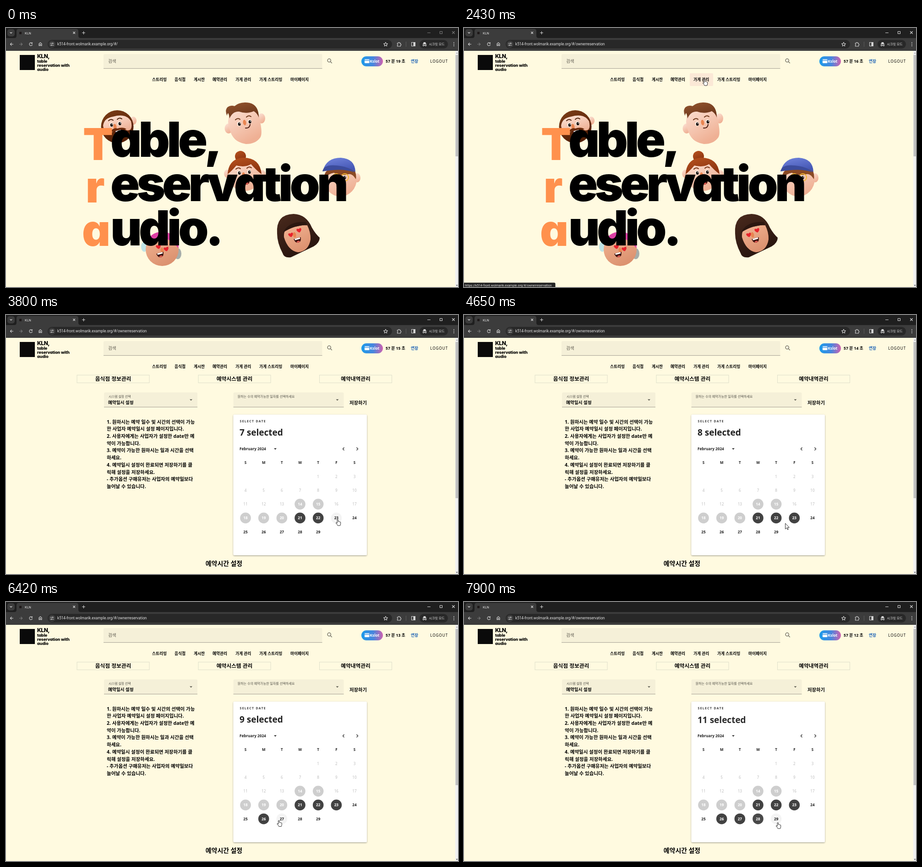
Write an HTML page that moves like this. It is 987 px wide and 567 px high and loops after 8000 ms.

```html
<!DOCTYPE html>
<html lang="ko">
<head>
<meta charset="utf-8">
<title>KLN</title>
<style>
html, body { margin: 0; width: 100%; height: 100%; overflow: hidden; background: #fffae0; }
svg { display: block; width: 987px; height: 567px; font-family: "Noto Sans", "Noto Sans CJK KR", "Noto Sans CJK", sans-serif; font-weight: 600; }
.ui { font-family: Roboto, "Noto Sans CJK KR", "Noto Sans CJK", sans-serif; font-weight: 400; fill: #e3e3e3; }
.big { font-family: Inter, sans-serif; font-weight: 800; font-feature-settings: "cv11"; }
.hero { font-weight: 900; letter-spacing: -6.8px; }
.line { fill: none; stroke: #d5d5d5; stroke-width: 1.1; stroke-linecap: round; stroke-linejoin: round; }
.mid { text-anchor: middle; }
</style>
</head>
<body>
<svg id="stage" viewBox="0 0 987 567"></svg>
<script>
const LOOP = 8000;
const HOST = 'k514-front.wolmarik.example.org/#/';
const ORANGE = '#ff914d';
const PAGE_AT = 2516, ACTIVE_AT = 2340, STATUS_AT = 1400;

const text = (x, y, size, str, attrs = '') => `<text x="${x}" y="${y}" font-size="${size}" ${attrs}>${str}</text>`;
const rect = (x, y, w, h, fill, attrs = '') => `<rect x="${x}" y="${y}" width="${w}" height="${h}" fill="${fill}" ${attrs}/>`;
const path = (d, attrs = 'class="line"') => `<path d="${d}" ${attrs}/>`;
const oval = (x, y, rx, ry, fill, attrs = '') => `<ellipse cx="${x}" cy="${y}" rx="${rx}" ry="${ry}" fill="${fill}" ${attrs}/>`;
const shape = (d, fill) => path(d, `fill="${fill}"`);
const stroke = (d, color, width) => path(d, `fill="none" stroke="${color}" stroke-width="${width}" stroke-linecap="round"`);

// ---------- browser window ----------
const browser = () => [
  rect(0, 0, 987, 50, '#1f1f1f'),
  rect(0, 22, 987, 28, '#3c3c3c'),
  shape('M18 22Q23 22 23 17V7Q23 2 28 2H153Q158 2 158 7V17Q158 22 163 22Z', '#3c3c3c'),
  rect(3, 2.5, 16, 16, '#3c3c3c', 'rx="5"'),
  path('M9 9.5l2 2l2-2'),
  rect(29, 8.5, 5, 5, '#1c1717'),
  text(41, 14, 7.4, 'KLN', 'class="ui"'),
  path('M146.7 8.5l4 4m0-4l-4 4'),
  path('M166.5 10.5h6m-3-3v6'),
  `<g id="controls">${path('M920.5 10.5h6M947.5 7.5h5v5h-5zM974.5 7.5l5 5m0-5l-5 5')}</g>`,
  path('M15.5 35.5h-6m2.7-2.8l-2.8 2.8l2.8 2.8'),
  path('M29.5 35.5h6m-2.7-2.8l2.8 2.8l-2.8 2.8', 'class="line" opacity=".4"'),
  path('M57 33.5a3.3 3.3 0 1 0 .4 3M57.3 31.8v2.2h-2.2'),
  path('M72 34.5l3-2.6l3 2.6v4.2h-2v-2.6h-2v2.6h-2z'),
  rect(91, 26, 752, 19, '#282828', 'rx="9.5"'),
  oval(100.5, 35.5, 7.5, 7.5, '#3c3c3c'),
  path('M97 33.5h3m3 0h1M97 37.5h1m3 0h3'),
  oval(101.7, 33.5, 1.2, 1.2, '#d5d5d5'), oval(99.3, 37.5, 1.2, 1.2, '#d5d5d5'),
  text(112, 38.4, 8.2, '', 'class="ui" id="url"'),
  path('M829 31.2l1.3 2.9l3.1.3l-2.3 2.1l.6 3.1l-2.7-1.6l-2.7 1.6l.6-3.1l-2.3-2.1l3.1-.3z'),
  path('M854.5 33h2.2a1.4 1.4 0 0 1 2.8 0h2v2.2a1.4 1.4 0 0 1 0 2.8v2h-7v-2.3a1.3 1.3 0 0 0 0-2.5z'),
  rect(873, 30, 1, 11, '#5c5c5c'),
  rect(885.5, 31.5, 8, 8, 'none', 'stroke="#d5d5d5"'), rect(889.5, 31.5, 4, 8, '#d5d5d5'),
  rect(903, 26, 62, 19, '#282828', 'rx="9.5"'),
  shape('M909.5 35.3h9v-.9h-1.4l-1-3.2h-4.2l-1 3.2h-1.4z', '#e3e3e3'),
  path('M913 38a1.4 1.4 0 1 0-.01.1M917.8 38a1.4 1.4 0 1 0-.01.1M913 37.6h2'),
  text(923.5, 38, 7.1, '시크릿 모드', 'class="ui"'),
  ...[32, 35.5, 39].map(y => oval(978, y, .9, .9, '#d5d5d5')),
].join('');

// ---------- page header ----------
const NAV = [['스트리밍', 319, 351], ['음식점', 368, 392], ['게시판', 410, 434], ['예약관리', 451, 484],
  ['가게 관리', 501, 536, 'ownerreservation'], ['가게 스트리밍', 553, 603, 'ownerstreaming'], ['마이페이지', 621, 661]];

const field = (x, y, w, h) => shape(`M${x} ${y + h}v${3 - h}q0-3 3-3h${w - 6}q3 0 3 3v${h - 3}z`, '#f5f0d8')
  + rect(x, y + h - .8, w, .9, '#98958a');

const header = () => [
  rect(30, 59, 33, 33, '#0a0a0a'),
  `<g class="big">${text(68, 66, 12, 'KLN,', 'letter-spacing="-.5"')}${['table', 'reservation with', 'audio']
    .map((s, i) => text(68, 76 + 9 * i, 9, s, 'letter-spacing="-.15"')).join('')}</g>`,
  field(213, 57, 477.5, 32),
  text(223, 76, 9.5, '검색', 'fill="#5c594e" font-weight="400"'),
  path('M709.3 71a3.6 3.6 0 1 0-7.2 0a3.6 3.6 0 0 0 7.2 0M708.4 73.6l3.4 3.4', 'fill="none" stroke="#66645a" stroke-width="1.3"'),
  rect(776, 62, 47, 22, 'url(#pill)', 'rx="11"'),
  rect(783, 68.5, 10.5, 8.5, '#fff', 'rx="1.2"'), rect(783, 70.3, 10.5, 1.4, '#3a8fe0'),
  text(794.5, 76, 8.3, 'Kslot', 'fill="#fff" font-weight="700"'),
  text(829, 76, 8.7, '', 'id="timer"'),
  text(884, 76, 8.8, '연장', 'fill="#1c62b5"'),
  text(926.5, 75.7, 8, 'LOGOUT', 'letter-spacing="1" font-weight="500"'),
  rect(0, 99, 0, 28, '#fbe8d6', 'id="navHover" rx="2"'),
  ...NAV.map(([s, x]) => text(x, 116, 8.7, s)),
].join('');

// ---------- home page ----------
const eye = (x, y) => oval(x, y, 4.2, 4.8, '#fff8ee') + oval(x + .6, y + .4, 3, 3.6, '#1c1210') + oval(x + 1.6, y - 1, .9, .9, '#fff');
const heart = (x, y) => path('M0 5C-9-1-5-7 0-3C5-7 9-1 0 5Z', `fill="#e8222c" transform="translate(${x} ${y}) rotate(-14)"`);
const brow = (x, y, color) => stroke(`M${x - 5} ${y + 2}q5-5 10-1`, color, 2);
const nose = (x, y, color = '#e98550') => oval(x, y, 3.5, 6, color, `transform="rotate(-10 ${x} ${y})"`);
const grin = (x, y) => `<g transform="translate(${x} ${y}) rotate(-16)">${shape('M-8-4H8Q7 6 0 6T-8-4Z', '#3a0f0c')}${rect(-6, -4, 12, 3, '#fff')}${oval(0, 4, 3.5, 1.8, '#d9584f')}</g>`;
const SKIN = 'url(#skin)', TAN = 'url(#tan)';

const bearded = () => oval(278, 203, 7, 9, SKIN)
  + oval(243, 216, 35.5, 36, 'url(#brown)')
  + shape('M212 214Q214 197 234 194Q262 186 273 204Q278 226 264 224Q244 214 232 228Q216 238 212 214Z', SKIN)
  + brow(229, 201, '#4b1f09') + brow(248, 198, '#4b1f09') + eye(230, 212) + eye(248, 209) + nose(238, 216)
  + shape('M228 226Q236 217 243 220Q254 216 263 221Q250 226 245 223Q236 230 228 226Z', '#6b2b0c') + grin(246, 228);

const youth = () => oval(486, 220, 8.5, 11, SKIN) + oval(558, 198, 8, 11, SKIN)
  + path('M485 205Q487 170 520 169Q551 168 554 200Q561 232 555 240Q545 254 524 254Q502 251 493 234Q486 220 485 205Z', `fill="${SKIN}"`)
  + shape('M483 193Q477 180 484 173Q491 168 499 171Q512 160 532 164Q552 169 552 196Q549 187 541 182Q526 189 509 183Q495 182 488 198Q487 189 485 186Q482 190 483 193Z', 'url(#brown2)')
  + brow(506, 199, '#6a3417') + brow(530, 193, '#6a3417') + eye(509, 210) + eye(532, 205) + nose(521, 207)
  + stroke('M523 219Q532 220 533 211', '#4a1c10', 2);

const bun = () => oval(512, 281, 12, 12, 'url(#red)') + oval(483, 319, 7, 9, SKIN) + oval(560, 320, 7, 9, SKIN)
  + oval(521, 321, 36.5, 36, SKIN)
  + shape('M484 320Q486 286 518 284Q555 284 558 320Q545 310 535 298Q522 306 503 301Q492 314 484 320Z', 'url(#red)')
  + brow(507, 307, '#6d2b0d') + brow(531, 305, '#6d2b0d') + eye(509, 317) + eye(531, 315) + nose(519, 322) + grin(525, 337);

const capped = () => oval(691, 330, 7, 10, SKIN) + oval(767, 328, 7, 10, SKIN) + oval(730, 330, 36, 39, SKIN)
  + shape('M695 329Q694 312 712 306H758Q766 318 764 331Q756 318 748 320Q730 325 716 317Q704 319 695 329Z', '#8a4a24')
  + shape('M692 312Q700 284 731 284Q762 286 763 315Q745 303 722 303Q701 306 692 312Z', 'url(#blue)')
  + shape('M691 314Q694 298 722 301Q748 303 762 316Q735 306 691 314Z', '#3c4c9c')
  + eye(722, 327) + eye(739, 327)
  + [721, 740].map(x => oval(x, 327, 8, 8, 'none', 'stroke="#f1b532" stroke-width="2"')).join('') + nose(730, 334) + grin(730, 347);

const bob = () => shape('M592 450Q589 408 628 407Q656 408 668 437Q676 451 685 459Q685 470 672 478L622 502Q607 504 604 493Q592 470 592 450Z', 'url(#dark)')
  + shape('M607 458Q606 442 616 438L657 430Q666 448 665 463Q661 488 638 491Q616 488 607 458Z', TAN)
  + shape('M606 445Q620 422 655 425L658 432Q634 430 606 447Z', '#2c1710')
  + heart(622, 453) + heart(640, 443) + nose(630, 453) + grin(637, 464);

const pink = () => oval(302, 479, 7, 11, '#bfe4e6') + oval(375, 494, 8, 12, '#a6adaa')
  + oval(341, 485, 36, 36, TAN)
  + shape('M306 474Q314 444 346 446Q376 452 377 482Q362 466 348 460Q328 462 306 474Z', '#dd3fa4')
  + heart(333, 479) + heart(350, 484) + nose(341, 487) + grin(337, 496);

const home = () => [
  bearded(), youth(), bun(), capped(), bob(), pink(),
  '<g class="big hero">',
  ...[['T', 168, 289, 'able,', 282], ['r', 174, 382, 'eservation', 379], ['a', 166, 477, 'udio.', 476]]
    .map(([cap, x, y, rest, y2]) => text(x, y, 96, cap, `fill="${ORANGE}"`) + text(228, y2, 106, rest)),
  '</g>',
].join('');

// ---------- reservation page ----------
const NOTES = ['1. 원하시는 예약 일수 및 시간의 선택이 가능', '한 사업자 예약일시 설정 페이지입니다.', '2. 사용자에게는 사업자가 설정한 date만 예',
  '약이 가능합니다.', '3. 예약이 가능한 원하시는 일과 시간을 선택', '하세요.', '4. 예약일시 설정이 완료되면 저장하기를 클',
  '릭해 설정을 저장하세요.', '- 추가옵션 구매유저는 사업자의 예약일보다', '늘어날 수 있습니다.'];
const PAST = [14, 15, 18, 19, 20];
const PICKS = { 21: 2400, 22: 2400, 23: 4330, 26: 5960, 27: 6875, 28: 7722 };
const HEADS = [[PAGE_AT, '7 selected'], [4330, '8 selected'], [5960, '9 selected'], [6875, '10 selected'], [7722, '11 selected']];
const colX = c => 523 + 39.67 * c;
const DAYS = Array.from({ length: 29 }, (_, i) => {
  const n = i + 1, cell = n + 3;
  return { n, x: colX(cell % 7), y: 353.5 + 30.3 * Math.floor(cell / 7) };
});

const dayCell = ({ n, x, y }) => {
  const past = PAST.includes(n);
  const color = past ? '#fff' : n < 21 ? '#bdbdbd' : '#212121';
  const disc = (id, fill, opacity) => oval(x, y, 11.8, 11.8, fill, `id="${id}${n}" opacity="${opacity}"`);
  return (past ? disc('past', '#cecece', 1) : n > 20 ? disc('hover', '#f4f4f4', 0) + disc('pick', '#424242', 0) : '')
    + text(x, y + 3, 8.2, n, `class="mid" id="day${n}" fill="${color}" font-weight="${n < 21 && !past ? 400 : 600}"`);
};

const owner = () => [
  ...[[234, '음식점 정보관리'], [499, '예약시스템 관리'], [763.5, '예약내역관리']].map(([x, s]) =>
    rect(x - 79, 131.5, 158, 17, 'none', 'stroke="#dedfca"') + text(x, 143.5, 11.7, s, 'class="mid" font-weight="700"')),
  field(214, 169.5, 204, 32.5), field(496.5, 169.5, 241, 32.5),
  text(224, 181, 7, '시스템 설정 선택', 'fill="#55534a" font-weight="400"'),
  text(223, 195, 9.6, '예약일시 설정'),
  text(505.5, 181, 7.1, '원하는 수의 예약가능한 일자를 선택하세요', 'fill="#55534a" font-weight="400"'),
  ...[404, 723.5].map(x => shape(`M${x - 3} 184.5h6l-3 3z`, '#5a584e')),
  text(750, 195.5, 10.3, '저장하기', 'font-weight="700"'),
  ...NOTES.map((s, i) => text(220, 237.6 + 15.72 * i, 10.5, s)),
  rect(496.5, 218, 291.5, 308, '#fff', 'rx="2.5" filter="url(#shadow)"'),
  text(510.5, 234.5, 6.8, 'SELECT DATE', 'letter-spacing="1.4" fill="#333"'),
  `<g clip-path="url(#headClip)" fill="#212121">${text(510, 264, 19, '', 'id="headOld"')}${text(510, 264, 19, '', 'id="headNew"')}</g>`,
  text(510, 296, 8.2, 'February 2024', 'fill="#212121"'),
  shape('M585 291.7h6l-3 3z', '#212121'),
  path('M738.5 290l-3 3.2l3 3.2M765.5 290l3 3.2l-3 3.2', 'fill="none" stroke="#212121" stroke-width="1.3"'),
  ...[...'SMTWTFS'].map((s, i) => text(colX(i), 326, 8, s, 'class="mid" fill="#212121"')),
  ...DAYS.map(dayCell),
  text(476, 549, 13.9, '예약시간 설정', 'class="mid" font-weight="700"'),
].join('');

const gradient = (id, a, b) => `<linearGradient id="${id}" x2=".5" y2="1"><stop stop-color="${a}"/><stop offset="1" stop-color="${b}"/></linearGradient>`;

document.getElementById('stage').innerHTML = `<defs>
  ${gradient('skin', '#fde5d9', '#efb094')}${gradient('tan', '#f3b695', '#dc9270')}${gradient('brown', '#7d3e18', '#541f06')}
  ${gradient('brown2', '#94552f', '#6b361b')}${gradient('red', '#b9531f', '#8b3410')}${gradient('blue', '#7285de', '#4557b4')}${gradient('dark', '#4a2a1d', '#27140e')}
  <linearGradient id="pill"><stop stop-color="#1c9bea"/><stop offset=".55" stop-color="#4886dd"/><stop offset="1" stop-color="#cf62b0"/></linearGradient>
  <filter id="shadow" x="-5%" y="-5%" width="110%" height="110%"><feDropShadow dx="0" dy="1.2" stdDeviation="1.6" flood-opacity=".38"/></filter>
  <clipPath id="headClip"><rect x="500" y="246.5" width="280" height="30.5"/></clipPath></defs>
  ${rect(0, 0, 987, 567, '#fffae0')}${header()}<g id="home">${home()}</g><g id="owner">${owner()}</g>
  ${rect(981, 49, 6, 518, '#f1f1f1')}${shape('M982.5 56l2-2.5l2 2.5z', '#a3a3a3')}${shape('M982.5 562.5l2 2.5l2-2.5z', '#505050')}
  ${rect(981.6, 59, 5.4, 222, '#c1c1c1', 'id="thumb"')}${browser()}
  <g id="status">${shape('M0 557.5H197q2.5 0 2.5 2.5v7H0z', '#242424')}${text(2, 566, 7, '', 'class="ui" id="statusText"')}</g>
  <g id="cursor" stroke="#111" stroke-width=".9" stroke-linejoin="round" fill="#fff">
    ${path('M4 0v12.5l2.9-2.7l1.9 4.2l1.8-.8l-1.9-4.1h3.9z', 'id="arrow"')}
    ${path('M3.2 1.4Q4.3-.1 5.4 1.4V5.2Q6.5 4.5 7.2 5.5Q8.3 5 9 6Q10.6 5.6 10.7 7.2V10.2Q10.5 12 9.6 14H4.4Q3.4 11.8.8 9Q.2 7.3 1.6 7.4L3.2 8.8Z', 'id="hand"')}
  </g>`;

// ---------- motion ----------
const el = id => document.getElementById(id);
const show = (id, on) => el(id).setAttribute('visibility', on ? 'visible' : 'hidden');
const put = (id, str) => { if (el(id).textContent !== str) el(id).textContent = str; };
const set = (id, name, value) => el(id).setAttribute(name, value);
const clamp = v => Math.min(1, Math.max(0, v));
const smooth = v => v * v * (3 - 2 * v);
const settle = (t, start) => 1 - (1 - smooth(clamp((t - start) / 250))) ** 2;

// time, x, y
const TRACK = [[280, 955, 568], [1060, 572, 128], [1180, 571, 125], [1320, 571, 125], [1490, 568, 114], [1740, 568, 114],
  [1880, 521, 112], [3150, 521, 112], [3800, 720, 447], [4400, 720, 447], [5060, 651, 475], [5120, 651, 475],
  [5720, 549, 475.5], [6020, 549, 475.5], [6600, 604, 478], [6880, 604, 478], [7030, 648, 481.5], [7450, 650, 481],
  [7740, 650, 481], [7890, 681, 482]];
const TICKS = [700, 1420, 2400, 3400, 4480, 6200, 7250];

function cursorAt(t) {
  const i = TRACK.findIndex(k => k[0] > t);
  if (i < 0) return TRACK[TRACK.length - 1].slice(1);
  if (i === 0) return TRACK[0].slice(1);
  const [t0, x0, y0] = TRACK[i - 1], [t1, x1, y1] = TRACK[i];
  const p = smooth((t - t0) / (t1 - t0));
  return [x0 + (x1 - x0) * p, y0 + (y1 - y0) * p];
}

function drawCalendar(t, hotX, hotY) {
  const i = HEADS.findLastIndex(h => t >= h[0]);
  const p = settle(t, HEADS[i][0]);
  put('headNew', HEADS[i][1]);
  put('headOld', i ? HEADS[i - 1][1] : 'Enter date');
  set('headNew', 'y', 264 + (i ? 27 : -27) * (1 - p));
  set('headOld', 'y', 264 + (i ? -27 : 21) * p);
  set('headNew', 'opacity', p);
  set('headOld', 'opacity', 1 - p);
  let hovered = false;
  for (const { n, x, y } of DAYS.slice(20)) {
    const over = Math.hypot(hotX - x, hotY - y) < 14;
    const picked = n in PICKS ? settle(t, PICKS[n]) : 0;
    set('hover' + n, 'opacity', over ? 1 : 0);
    set('pick' + n, 'opacity', picked);
    set('day' + n, 'fill', picked > .4 ? '#fff' : '#212121');
    hovered = hovered || over;
  }
  return hovered;
}

function draw(t) {
  const onOwner = t >= PAGE_AT;
  const [x, y] = cursorAt(t), hotX = x + 4;
  const link = NAV.find(n => y > 99 && y < 127 && hotX > n[1] - 8.5 && hotX <= n[2] + 8.5);
  show('home', !onOwner);
  show('owner', onOwner);
  set('thumb', 'height', onOwner ? 342 : 222);
  const overDay = onOwner && drawCalendar(t, hotX, y);

  put('timer', `57 분 ${19 - TICKS.filter(k => t >= k).length} 초`);
  put('url', HOST + (t >= 2400 ? 'ownerreservation' : ''));
  set('controls', 'opacity', t >= ACTIVE_AT ? 1 : .5);

  set('navHover', 'x', link ? link[1] - 8 : 0);
  set('navHover', 'width', link ? link[2] - link[1] + 16 : 0);
  show('status', link && link[3] && t >= STATUS_AT);
  if (link && link[3]) put('statusText', 'https://' + HOST + link[3]);

  const pointing = Boolean(link || overDay);
  set('cursor', 'transform', `translate(${x} ${y})`);
  show('arrow', t >= 280 && !pointing);
  show('hand', t >= 280 && pointing);
}

const start = performance.now();
function tick() {
  draw((performance.now() - start) % LOOP);
  requestAnimationFrame(tick);
}
tick();
</script>
</body>
</html>
```
